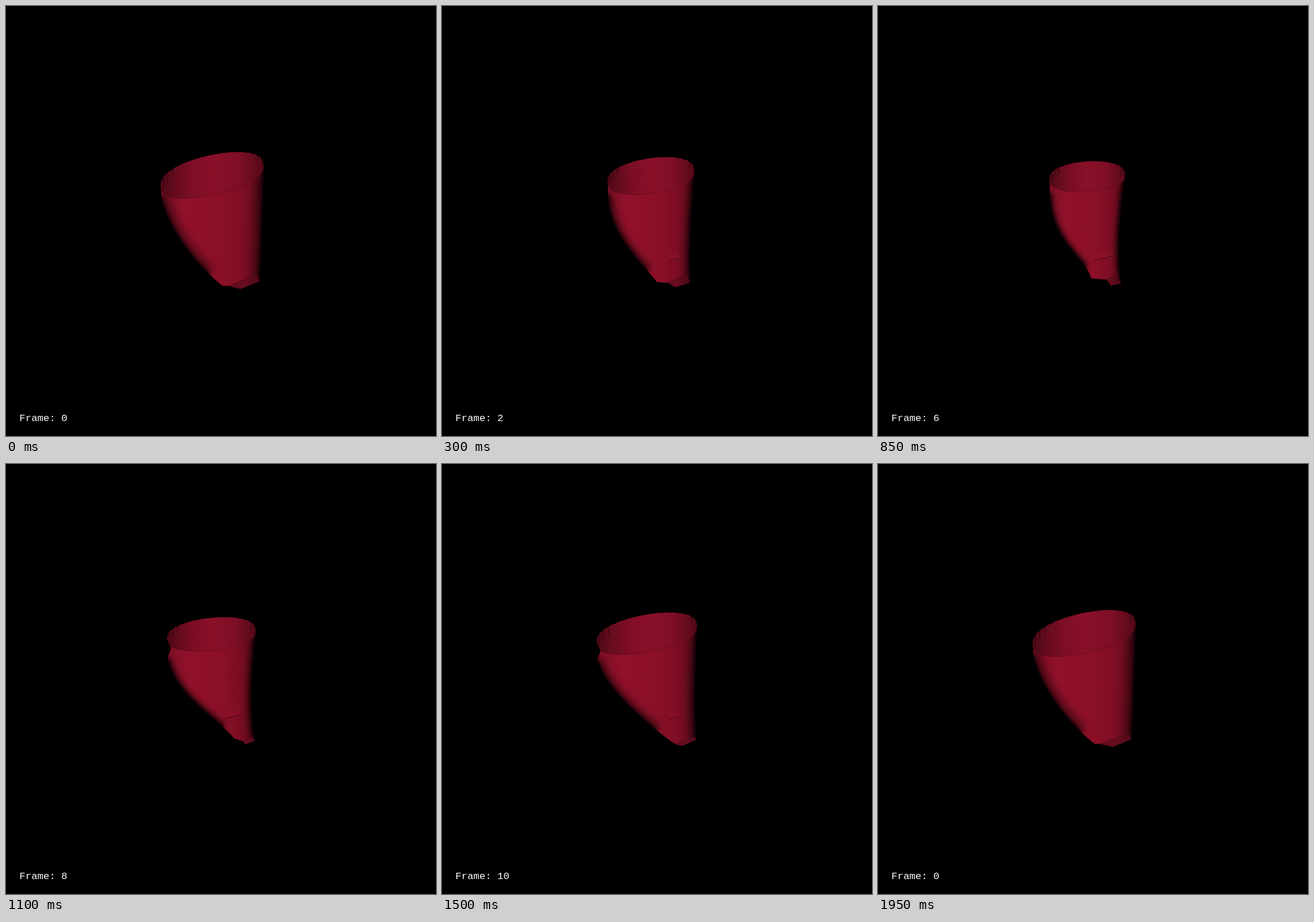
An HTML page with a canvas for the animation above (2050 ms loop, 748 by 748 pixels).

```html
<!DOCTYPE html>
<html lang="en">
<head>
<meta charset="utf-8">
<title>Beating mesh</title>
<style>
  html, body { margin: 0; width: 100%; height: 100%; overflow: hidden; background: #000; }
  canvas { display: block; }
</style>
</head>
<body>
<canvas id="stage" width="748" height="748"></canvas>
<script>
const ctx = document.getElementById('stage').getContext('2d');
const LOOP = 2050;
// start time of each mesh step; the last one returns to step 0
const STARTS = [0, 150, 300, 400, 500, 650, 800, 950, 1100, 1200, 1400, 1600, 1950];

const { PI, sin, cos, max } = Math;
const mix = (a, b, k) => a + (b - a) * k;

// rises from 0 to 1 at the peak step, then relaxes until the end step
function pulse(step, peak, end) {
  if (step < peak) return sin(PI / 2 * step / peak);
  return step < end ? cos(PI / 2 * (step - peak) / (end - peak)) ** 2 : 0;
}

// Bezier curve of any degree, sampled by repeated mixing
function bezier(pts, n = 24) {
  return Array.from({ length: n + 1 }, (_, i) => {
    let p = pts;
    while (p.length > 1) {
      p = p.slice(1).map((q, j) => [mix(p[j][0], q[0], i / n), mix(p[j][1], q[1], i / n)]);
    }
    return p[0];
  });
}

function trace(pts) {
  ctx.beginPath();
  pts.forEach(p => ctx.lineTo(...p));
}

function fill(pts, style) {
  trace(pts);
  ctx.fillStyle = style;
  ctx.fill();
}

function line(pts, style, width, blur = 0) {
  ctx.filter = blur ? `blur(${blur}px)` : 'none';
  trace(pts);
  ctx.strokeStyle = style;
  ctx.lineWidth = width;
  ctx.stroke();
  ctx.filter = 'none';
}

function gradient(x0, y0, x1, y1, stops) {
  const g = ctx.createLinearGradient(x0, y0, x1, y1);
  stops.forEach(([at, color]) => g.addColorStop(at, color));
  return g;
}

function drawMesh(step) {
  const base = pulse(step, 5, 10);             // left end of the rim
  const wall = pulse(step, 6, 12);             // everything else
  const swing = max(0, sin(PI * (step - 6) / 6)); // tip moves aside while refilling
  const at = (x, y, x2, y2, sx = 0, sy = 0) =>
    [mix(x, x2, wall) + sx * swing, mix(y, y2, wall) + sy * swing];

  // rim: a tilted, slightly squared ellipse
  const x0 = mix(269, 301, base), x1 = mix(448, 430, wall);
  const cx = (x0 + x1) / 2, rx = (x1 - x0) / 2;
  const cy = mix(296, 298, wall), ry = mix(37, 27.5, wall), tilt = mix(.2, .06, wall);
  const arc = height => Array.from({ length: 33 }, (_, i) => {
    const a = PI * i / 32, u = -cos(a);
    const tooth = height < 0 ? (i % 2 ? 1.3 : -.8) * u * u : 0;
    return [cx + rx * u, cy - tilt * rx * u + height * max(0, sin(a)) ** .8 + tooth];
  });
  const back = arc(-ry), front = arc(ry * .9);

  // walls and lower opening
  const tipR = at(441, 479, 423, 483, 6), tip = at(408, 492, 405, 486, 12);
  const lip = at(387, 487, 398, 476, 20, 4), tipL = at(377, 487, 371, 474, 28);
  const edge = at(436, 468, 412, 467, 12, 8);
  const right = bezier([back[32], at(445, 400, 411, 420), tipR]);
  const shoulder = [x0 + 1, mix(330, 325, wall) + 13 * swing];
  const left = bezier([tipL, at(330, 450, 360, 435, 15), at(280, 385, 300, 410), shoulder]);
  const dent = [x0 + 1 + 7 * swing, (shoulder[1] + back[0][1]) / 2];

  ctx.save();
  const body = [...back, ...right, tip, lip, ...left, dent];
  fill(body, gradient(x0, 0, x1, 0, [
    [0, '#7e0f24'], [.25, '#90112a'], [.6, '#8b1027'], [.8, '#7d0e23'], [1, '#5c0a1b']
  ]));
  trace(body);
  ctx.clip();

  // sides turning away from the light
  const soft = mix(22, 12, wall);
  for (const side of [right, left.slice(4)]) {
    line(side, 'rgba(0,0,0,.5)', soft, soft / 3);
    line(side, 'rgba(0,0,0,.7)', 5, 2);
  }

  // inside wall
  fill([...back, ...front.slice().reverse()], gradient(x0, 0, x1, 0, [
    [0, '#4c0816'], [.14, '#660c1e'], [.3, '#7c0e24'], [.5, '#891028'], [.75, '#7f0f25'], [1, '#560919']
  ]));
  for (const i of [3, 5, 7, 27, 29]) {
    const [x, y] = back[i];
    fill([[x, y], [x + 3, y + 1], [x + 1, y + 18]], 'rgba(35,3,10,.45)');
  }
  line(front.slice(4, 24), 'rgba(50,5,14,.35)', 1);

  // open lower end
  fill([tipL, lip, edge, tipR, tip], gradient(tipL[0], 0, tipR[0], 0, [
    [0, '#5c0a1b'], [.6, '#680c1f'], [1, '#4c0816']
  ]));
  line([tipL, lip, edge], 'rgba(50,5,14,.5)', 1);

  // fold in the wall
  const w = 34 * sin(PI * step / 12);
  const fold = [416 - 1.2 * w, 443], end = [416 - .2 * w, 443 - .24 * w];
  if (w > 1) {
    fill([[fold[0] - 4, 432], fold, end, [end[0], end[1] - 13]],
      gradient(0, 425, 0, 443, [[0, 'rgba(147,18,43,0)'], [1, 'rgba(147,18,43,.75)']]));
    line([fold, end], 'rgba(70,8,20,.75)', 1.5);
  }
  ctx.restore();
}

function draw() {
  const t = performance.now() % LOOP;
  const step = STARTS.findLastIndex(s => s <= t) % 12;
  ctx.fillStyle = '#000';
  ctx.fillRect(0, 0, 748, 748);
  drawMesh(step);
  ctx.fillStyle = '#fff';
  ctx.font = '17.4px "Liberation Mono", monospace';
  ctx.fillText('Frame: ' + step, 23.3, 722);
  requestAnimationFrame(draw);
}
draw();
</script>
</body>
</html>
```
